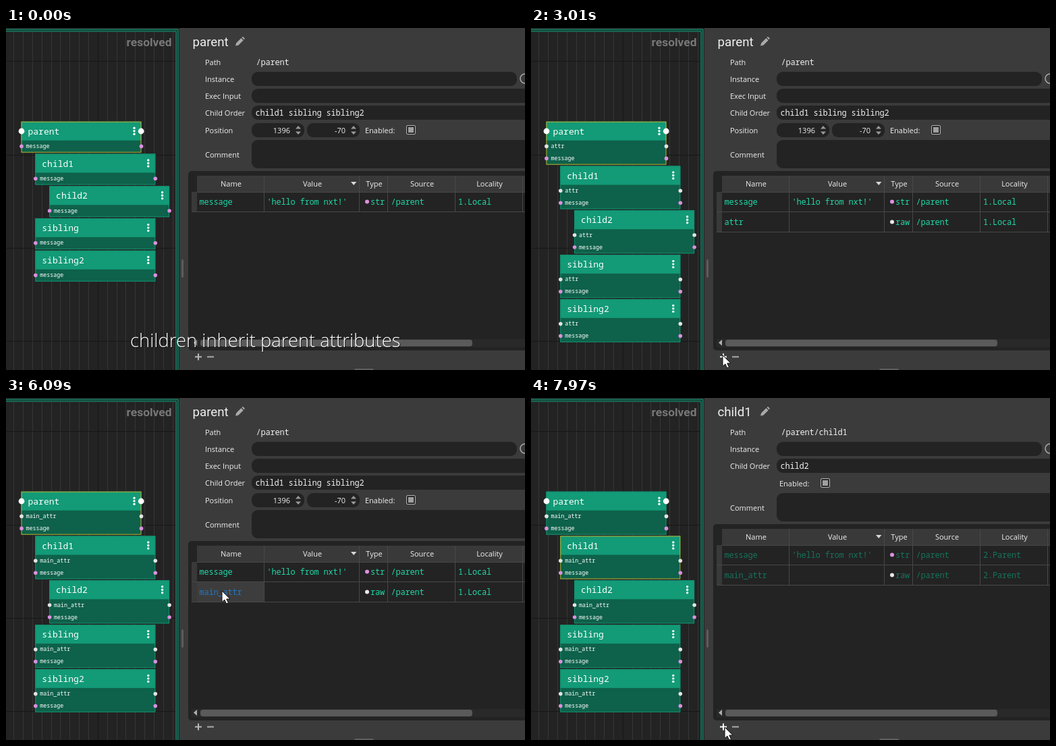
These frames come from a looping animation (769x507 px, 8 s). An HTML page:

```html
<!DOCTYPE html>
<html lang="en">
<head>
<meta charset="utf-8">
<title>Inherited attributes</title>
<style>
  html, body { margin: 0; width: 100%; height: 100%; overflow: hidden; background: #232323; }
  svg { display: block; width: 769px; height: 507px; }
  text { white-space: pre; }
  .ui { font: 11px "Open Sans", "Noto Sans", sans-serif; fill: #f0f0f0; }
  .bold { font-weight: 700; }
  .mono { font: 12px "Roboto Mono", "Noto Sans Mono", monospace; letter-spacing: -.2px; }
  .node { font: 13px "Roboto Mono", "Noto Sans Mono", monospace; fill: #fff; }
  .plug { font: 8.33px "Roboto Mono", "Noto Sans Mono", monospace; fill: #fff; }
  .title { font: 18.7px Roboto, sans-serif; fill: #f0f0f0; }
  .tag { font: bold 17.4px Roboto, sans-serif; fill: #777; }
  .caption { font: 300 27.4px "Open Sans", "Noto Sans", sans-serif; }
</style>
</head>
<body>
<svg id="stage" viewBox="0 0 769 507"></svg>
<script>
const LOOP = 8000, TICK = 169;
const stage = document.getElementById('stage');

// Moments at which the interface changes.
const T = { burst: 170, spread: 1170, clear: 2170, add: 3010, edit: 4360,
            type: 4540, typed: 4720, commit: 4900, hover: 5910, pick: 6770 };

// Pointer goals (time, x, y): the add button, the name cell, a node and back.
const GOALS = [
  [T.clear, 322, 440], [2500, 284, 485], [T.add, 284, 485], [4020, 320, 286],
  [6250, 320, 286], [T.pick, 183, 222], [6930, 289, 255], [7450, 351, 449], [7950, 287, 488]
];

const rect = (x, y, w, h, fill, more = '') =>
  `<rect x="${x}" y="${y}" width="${w}" height="${h}" fill="${fill}" ${more}/>`;
const dot = (x, y, r, fill) => `<circle cx="${x}" cy="${y}" r="${r}" fill="${fill}"/>`;
const path = (d, fill, more = '') => `<path d="${d}" fill="${fill}" ${more}/>`;
const line = (d, color, width = 1, more = '') =>
  path(d, 'none', `stroke="${color}" stroke-width="${width}" ${more}`);
const text = (cls, x, y, s, more = '') => `<text class="${cls}" x="${x}" y="${y}" ${more}>${s}</text>`;
const label = (x, y, s) => text('ui', x, y + 4, s);
const mono = (x, y, s, fill = '#f0f0f0') => text('mono', x, y + 4, s, `fill="${fill}"`);
const field = (y, h = 21, w = 430, x = 364) => rect(x, y, w, h, '#232323', 'rx="9"');

function grid() {
  let minor = '', major = 'M136.5 6V507';
  for (let x = 11.2; x < 250; x += 13.85) minor += `M${Math.round(x) + .5} 6V507`;
  for (let y = 49.3; y < 507; y += 138.2) major += `M0 ${Math.round(y) + .5}H251`;
  return rect(0, 0, 257, 507, '#232323') + line(minor, '#363636') + line(major, '#171717') +
    line('M-5 3.5H253.5V512', '#123f33', 2) +
    line('M-5 2H255V512M-5 5H252V512', '#13a07c') +
    text('tag', 245.5, 27, 'resolved', 'text-anchor="end"');
}

function node(x, y, name, attrs, selected, exec) {
  const h = 28 + 18 * attrs.length;
  let s = rect(x, y, 178, h, '#0e614a') + rect(x, y, 178, 28, '#139a77') +
    rect(x + .5, y + .5, 177, h - 1, 'none', `stroke="${selected ? '#b9ae2c' : '#138f6f'}"`) +
    text('node', x + 10, y + 19, name);
  for (const d of [-4.5, 0, 4.5]) s += dot(x + 167.5, y + 14 + d, 1.7, '#fff');
  if (exec) s += dot(x + .5, y + 14.3, 4.4, '#fff') + dot(x + 177.7, y + 14.3, 4.4, '#fff');
  attrs.forEach((a, i) => {
    const cy = y + 36.7 + 18 * i, c = a === 'message' ? '#dc90df' : '#e4e4e4';
    s += dot(x + .5, cy, 2.8, c) + dot(x + 178, cy, 2.8, c) + text('plug', x + 7, cy + 2.5, a);
  });
  return s;
}

function tree(t) {
  const attrs = ['message'];
  if (t >= T.add) attrs.unshift(t >= T.commit ? 'main_attr' : 'attr');
  const step = attrs.length > 1 ? 65.8 : 47.8;
  const depth = { parent: 0, child1: 1, child2: 2, sibling: 1, sibling2: 1 };
  const picked = t >= T.pick ? 'child1' : 'parent';
  return Object.keys(depth).map((n, i) =>
    node(22.5 + 20.8 * depth[n], 138.7 + step * i, n, attrs, n === picked, !i)).join('');
}

function spinner(x, value) {
  const a = x + 69;
  return field(141, 21, 78, x) + text('ui', x + 57, 156, value, 'text-anchor="end"') +
    path(`M${a - 4} 149.5L${a} 145L${a + 4} 149.5ZM${a - 4} 153.5L${a} 158L${a + 4} 153.5Z`, '#9a9a9a');
}

const enabled = (x, y) => label(x, y, 'Enabled:') +
  rect(x + 61.5, y - 7.5, 13, 13, '#2a2a2a', 'rx="1.5" stroke="#b0b0b0"') +
  rect(x + 64, y - 5, 8, 8, '#a0a0a0');

function form(child) {
  const s = rect(257, 0, 512, 507, '#3b3b3b') + rect(260, 343, 3, 27, '#5c5c5c', 'rx="1.5"') +
    text('title', 276.5, 27, child ? 'child1' : 'parent') +
    path('M340 26.5L341.2 22.2L348.4 15L351.7 18.3L344.4 25.5ZM349.4 14L351 12.8L353.9 15.5L352.6 17.2Z', '#aaa') +
    label(295, 51, 'Path') + mono(370.5, 51, child ? '/parent/child1' : '/parent') +
    label(295, 76, 'Instance') + field(65, 21, 393) +
    '<circle cx="769" cy="75" r="7" fill="none" stroke="#aaa" stroke-width="1.5"/>';
  const order = (y, names) => label(295, y, 'Child Order') + field(y - 11) + mono(369.5, y, names);
  const comment = y => label(295, y, 'Comment') + field(y - 22, 42);
  if (child) return s + order(101, 'child2') + enabled(368, 127) + comment(163);
  return s + label(295, 101, 'Exec Input') + field(90) + order(126, 'child1 sibling sibling2') +
    label(295, 152, 'Position') + spinner(364, '1396') + spinner(446, '-70') +
    enabled(532, 152) + comment(188);
}

function editor(t) {
  const fresh = t < T.type;
  const value = fresh ? 'attr' : t < T.typed ? 'main_' : 'main_attr';
  return rect(286.5, 276.5, 92, 22, '#232323', 'rx="1" stroke="#1b77c0"') +
    (fresh ? rect(291, 280, 18, 15, '#2c6594') : '') + text('ui', 291, 292, value);
}

function table(t, child, at) {
  const top = child ? 194 : 219, editing = t >= T.edit && t < T.commit;
  const heads = { Name: 283, Value: 383, Type: 524, Source: 566, Locality: 666 };
  const edges = [...Object.values(heads), 766];
  const ink = child ? '#16735a' : '#20d8a6';
  const rows = [['message', "'hello from nxt!'", 'str', '#dc90df']];
  if (t >= T.add) rows.push([t >= T.commit ? 'main_attr' : 'attr', '', 'raw', '#e8e8e8']);

  let s = rect(270, top - 7, 510, 485 - top, '#232323', 'rx="5"') + rect(283, top, 490, 25, '#393939');
  if (editing) s += rect(283, top, 100, 25, '#1464a0');
  Object.keys(heads).forEach((h, i) => {
    s += text(editing && !i ? 'ui bold' : 'ui', (edges[i] + edges[i + 1]) / 2 + .5, top + 16, h, 'text-anchor="middle"');
  });
  s += path(`M511 ${top + 9}H519.5L515.2 ${top + 14}Z`, '#d8d8d8');

  let rules = `M283 ${top + 24.5}H769`;
  rows.forEach(([name, value, type, color], i) => {
    const y = top + 24 + i * 30, cy = y + 15;
    const active = i && editing;
    const live = i && !child && at && at[0] > 283 && at[0] < 383 && at[1] > y && at[1] < y + 30;
    s += rect(275, y, 8, 30, active ? '#1464a0' : '#393939');
    if (live) s += rect(283, y, 100, 30, '#3d3d3d');
    s += active ? editor(t) : mono(286.5, cy, name, live ? '#1f79c9' : ink);
    s += mono(386.5, cy, value, ink) + dot(535, cy - .5, 3, color) + mono(540, cy, type, ink) +
      mono(570.5, cy, '/parent', ink) + mono(670, cy, child ? '2.Parent' : '1.Local', ink);
    rules += `M275 ${y + 29.5}H769`;
  });
  for (const x of edges.slice(1)) rules += `M${x - .5} ${top}v${24 + rows.length * 30}`;
  return s + line(rules, '#484848');
}

function footer(at) {
  const hot = at && Math.hypot(at[0] - 285, at[1] - 487) < 7;
  return rect(275, 461, 500, 12, '#292929') + path('M283 462V471L278 466.5Z', '#b0b0b0') +
    rect(288, 462, 403, 10, '#5a5a5a', 'rx="4"') +
    line('M280 487.5H290M285 482.5V492.5', hot ? '#fff' : '#b8b8b8', 2) +
    line('M298 487.5H308', '#aaa', 2) + rect(516, 505, 29, 4, '#606060', 'rx="2"');
}

// Eight curved strokes around a label, open to the right.
function burst(cx, cy, rx, ry) {
  let d = '';
  for (let i = 0; i < 8; i++) {
    const a = (50 + 38 * i) * Math.PI / 180;
    const on = (k, turn) => `${cx + rx * k * Math.cos(a + turn)} ${cy + ry * k * Math.sin(a + turn)}`;
    d += `M${on(1, 0)}Q${on(.8, -.07)} ${on(.6, 0)}`;
  }
  return line(d, '#0fbcfa', 2, 'stroke-linecap="round"');
}

function bursts(t) {
  if (t < T.burst || t >= T.clear) return '';
  if (t < T.spread) return burst(46, 176, 37, 18);
  return burst(64, 222, 43, 25) + burst(78, 264, 26, 25) + burst(64, 363, 43, 26);
}

function caption(t) {
  if (t >= T.clear) return '';
  const words = 'children inherit parent attributes';
  return text('caption', 185, 474, words, 'fill="#000" opacity=".65"') +
    text('caption', 184, 473, words, 'fill="#fff"');
}

// Eased pointer position, refreshed once per tick; absent while typing.
function pointerAt(t) {
  if (t < T.clear || (t >= T.type && t < T.hover)) return null;
  const q = Math.max(T.clear, T.burst + Math.floor((t - T.burst) / TICK) * TICK);
  const i = GOALS.findIndex(g => g[0] > q);
  if (i < 0) return GOALS[GOALS.length - 1].slice(1);
  const [a, b] = [GOALS[i - 1], GOALS[i]];
  const u = (q - a[0]) / (b[0] - a[0]), e = u * u * (3 - 2 * u);
  return [a[1] + (b[1] - a[1]) * e, a[2] + (b[2] - a[2]) * e];
}

function pointer(t, at) {
  if (!at) return '';
  const beam = t >= T.edit && t < T.type;
  const d = 'M-3-5.5H-.5L.5-4.5L1.5-5.5H4M.5-4.5V6.5M-3 7.5H-.5L.5 6.5L1.5 7.5H4';
  const shape = beam ? line(d, '#111', 2.5) + line(d, '#fff', 1.1) :
    path('M0 0V16.5L3.8 13L6.6 19L9.4 17.7L6.7 12H12Z', '#fff', 'stroke="#111" stroke-linejoin="round"');
  return `<g transform="translate(${at[0]} ${at[1]})">${shape}</g>`;
}

let shown = '';
function draw(t) {
  const at = pointerAt(t), child = t >= T.pick;
  const next = grid() + tree(t) + form(child) + table(t, child, at) + footer(at) +
    bursts(t) + caption(t) + pointer(t, at);
  if (next !== shown) stage.innerHTML = shown = next;
}

const start = performance.now();
function tick(now) {
  draw(Math.max(0, now - start) % LOOP);
  requestAnimationFrame(tick);
}
draw(0);
requestAnimationFrame(tick);
</script>
</body>
</html>
```
